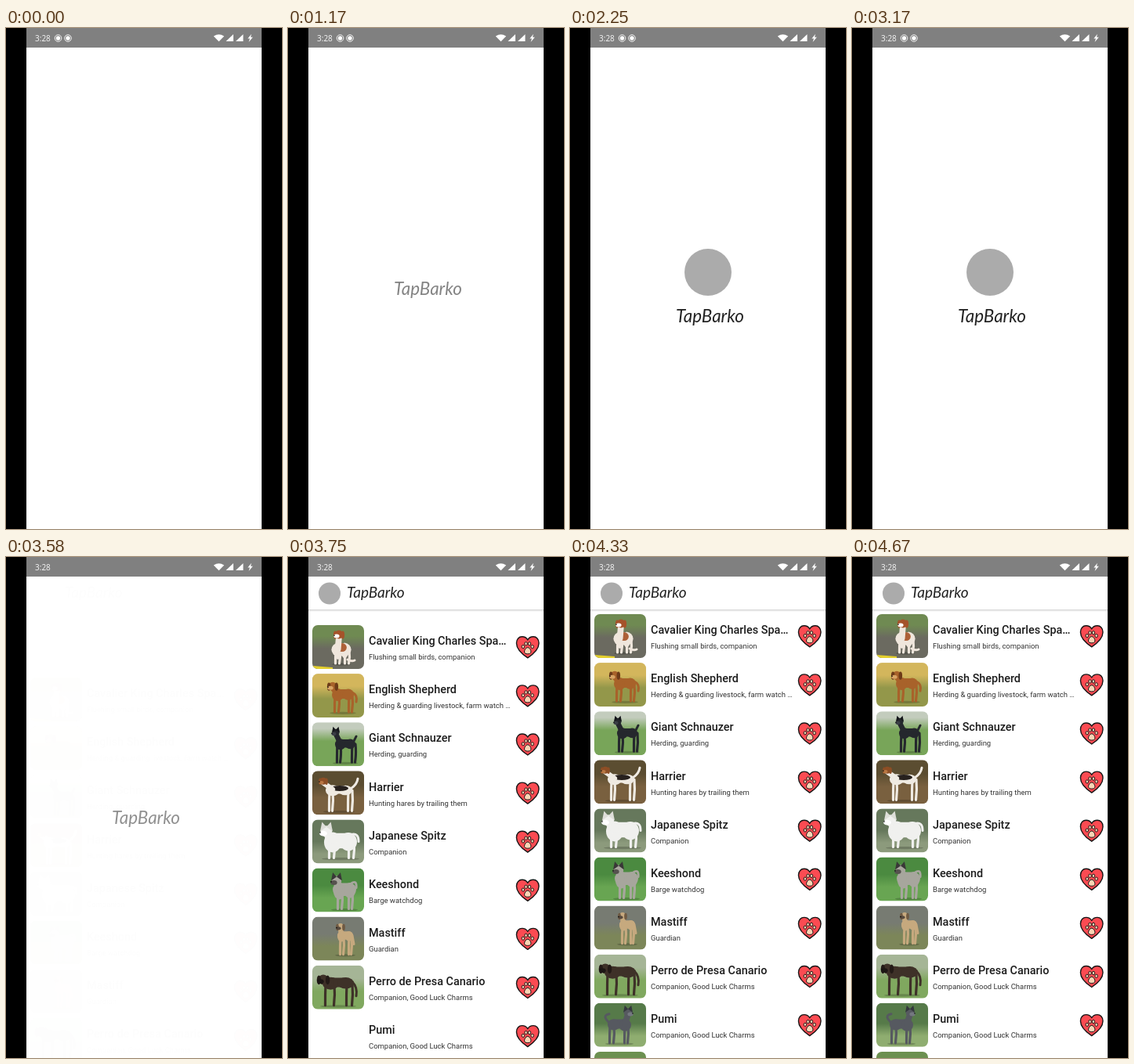
An HTML page for the animation above (4760 ms loop, 352 px wide and 640 px high).

```html
<!DOCTYPE html>
<html lang="en">
<head>
<meta charset="utf-8">
<title>Dog list</title>
<style>
html, body { margin: 0; width: 100%; height: 100%; overflow: hidden; background: #000; }
svg { display: block; width: 352px; height: 640px; }
.time { font: 10px "Noto Sans", sans-serif; fill: #f0f0f0; }
.brand { font: italic 400 22.4px Lato, sans-serif; fill: #222; }
.title { font: 500 14.4px Roboto, sans-serif; fill: #1c1c1c; }
.note { font: 400 9.46px Roboto, sans-serif; fill: #333; }
</style>
</head>
<body>
<svg viewBox="0 0 352 640" xmlns="http://www.w3.org/2000/svg">
  <defs>
    <clipPath id="screen"><rect x="26" y="0" width="300" height="640"/></clipPath>
    <clipPath id="thumb"><rect width="66" height="56" rx="7"/></clipPath>
    <linearGradient id="shade" x2="0" y2="1">
      <stop offset="0" stop-color="#d2d2d2"/><stop offset="1" stop-color="#fff"/>
    </linearGradient>
    <g id="heart">
      <path d="M0 13.8C-5 10.5-14.3 3.5-14.3-5C-14.3-10.3-11-13.2-7.2-13.2C-4-13.2-1.4-11.6 0-9.1C1.4-11.6 4-13.2 7.2-13.2C11-13.2 14.3-10.3 14.3-5C14.3 3.5 5 10.5 0 13.8Z"
        fill="#fb4b52" stroke="#151515" stroke-width="1.4" stroke-linejoin="round"/>
      <g fill="#fcd5b5" stroke="#151515" stroke-width="1">
        <path d="M0 .6C2.4.6 4.2 4 4.2 6C4.2 8.2 2.2 8.8 0 8.8C-2.2 8.8-4.2 8.2-4.2 6C-4.2 4-2.4.6 0 .6Z"/>
        <ellipse cx="-5.9" cy="-.4" rx="1.7" ry="2.1"/>
        <ellipse cx="-2.2" cy="-4.2" rx="1.7" ry="2.2"/>
        <ellipse cx="2.2" cy="-4.2" rx="1.7" ry="2.2"/>
        <ellipse cx="5.9" cy="-.4" rx="1.7" ry="2.1"/>
      </g>
    </g>
  </defs>
  <rect width="352" height="640"/>
  <g clip-path="url(#screen)">
    <rect x="26" width="300" height="640" fill="#fff"/>
    <circle id="logo" r="30" fill="#ababab"/>
    <text id="brand" class="brand" x="178.5" text-anchor="middle">TapBarko</text>
    <g id="home">
      <g id="list"></g>
      <rect x="26" y="25" width="300" height="42" fill="#fff"/>
      <rect x="26" y="67" width="300" height="3" fill="url(#shade)"/>
      <circle cx="53" cy="46.5" r="14" fill="#ababab"/>
      <text class="brand" x="75" y="52" style="font-size:19px">TapBarko</text>
    </g>
    <rect x="26" width="300" height="25" fill="#808080"/>
    <text class="time" x="37" y="16.6">3:28</text>
    <g id="dots" fill="#fff">
      <circle cx="66.5" cy="13" r="2.7"/><circle cx="79" cy="13" r="2.7"/>
      <g fill="none" stroke="#fff" stroke-width=".9">
        <circle cx="66.5" cy="13" r="4.3"/><circle cx="79" cy="13" r="4.3"/>
      </g>
    </g>
    <g fill="#fff">
      <path d="M271.5 17.2L264.8 10.6Q271.5 5.8 278.2 10.6Z"/>
      <path d="M280.5 17L290 8V17ZM293 17L302.5 8V17Z"/>
      <path d="M313 7.8L308.3 13.6H311L309.6 18L314.8 11.8H312Z"/>
    </g>
  </g>
</svg>
<script>
const LOOP = 4760, STEP = 1000 / 12, PITCH = 62.1;
const $ = id => document.getElementById(id);
const clamp = x => Math.max(0, Math.min(1, x));
const span = (t, a, b) => clamp((t - a) / (b - a));
const easeOut = x => 1 - (1 - x) ** 2;
const smooth = x => x * x * (3 - 2 * x);

// head: x, y, r; body: x, y, rx, ry; feet: four leg positions, then ground level
const dogs = [
  { name: 'Cavalier King Charles Spa…', job: 'Flushing small birds, companion',
    sky: '#6f8a52', ground: '#6b6a60', line: 22, coat: '#efe6dc', ear: '#a5532a', face: '#fff', back: '#ad6037',
    head: [34, 12, 6], body: [37, 33, 9, 11], feet: [30, 35, 42, 47, 49], tail: 'M45 44Q50 47 54 45',
    extra: '<path d="M0 52L26 54V56H0Z" fill="#e3cf2d"/>' },
  { name: 'English Shepherd', job: 'Herding & guarding livestock, farm watch …',
    sky: '#d3b65c', ground: '#93974a', line: 24, coat: '#a8622a', ear: '#6d3b18', face: '#d9a566',
    head: [26, 16, 6], body: [39, 27, 14, 8], feet: [29, 34, 47, 51, 49], tail: 'M51 24Q58 27 56 36' },
  { name: 'Giant Schnauzer', job: 'Herding, guarding',
    sky: '#c3ccbd', ground: '#78a559', line: 16, coat: '#25282d', ear: '#14161a', face: '#3b3f46', pointed: true,
    head: [30, 13, 5], body: [42, 28, 13, 7], feet: [32, 36, 51, 55, 51], tail: 'M53 24L56 18' },
  { name: 'Harrier', job: 'Hunting hares by trailing them',
    sky: '#5b4d31', ground: '#79603f', line: 26, coat: '#efeae2', ear: '#8d4e25', face: '#b97743', back: '#27211e',
    head: [14, 13, 5], body: [34, 25, 17, 7], feet: [22, 26, 46, 51, 51], tail: 'M50 22Q57 17 58 10' },
  { name: 'Japanese Spitz', job: 'Companion',
    sky: '#66785c', ground: '#8c9a7c', line: 36, coat: '#f0f0ee', ear: '#deded9', face: '#fff', pointed: true,
    head: [18, 15, 8], body: [36, 29, 21, 13], feet: [22, 28, 47, 53, 49], tail: 'M50 19Q59 17 59 28' },
  { name: 'Keeshond', job: 'Barge watchdog',
    sky: '#4b8a40', ground: '#68a552', line: 30, coat: '#a7a69d', ear: '#393837', face: '#55524e', pointed: true,
    head: [31, 16, 7], body: [41, 29, 14, 11], feet: [33, 38, 47, 51, 52], tail: 'M49 20Q57 14 56 25' },
  { name: 'Mastiff', job: 'Guardian',
    sky: '#777b72', ground: '#7c8659', line: 30, coat: '#c6a97e', ear: '#6f5a43', face: '#57493d',
    head: [36, 13, 5], body: [42, 25, 10, 7], feet: [36, 40, 47, 50, 48], tail: 'M51 24L53 35' },
  { name: 'Perro de Presa Canario', job: 'Companion, Good Luck Charms',
    sky: '#a5b596', ground: '#80a85f', line: 25, coat: '#3e3128', ear: '#241b17', face: '#1d1715',
    head: [14, 18, 7], body: [33, 23, 20, 8], feet: [17, 28, 44, 51, 51], tail: 'M51 21Q58 28 56 39' },
  { name: 'Pumi', job: 'Companion, Good Luck Charms',
    sky: '#567a49', ground: '#8fad70', line: 34, coat: '#565960', ear: '#34373d', face: '#747880', pointed: true,
    head: [43, 12, 6], body: [32, 28, 15, 8], feet: [20, 25, 39, 43, 51], tail: 'M19 25Q9 16 19 14' },
  { name: '', job: '', sky: '#6c9050', ground: '#6c9050', line: 40 }
];

function ellipse(x, y, rx, ry, fill) {
  return `<ellipse cx="${x}" cy="${y}" rx="${rx}" ry="${ry}" fill="${fill}"/>`;
}

function stroke(d, color, width) {
  return `<path d="${d}" fill="none" stroke="${color}" stroke-width="${width}" stroke-linecap="round"/>`;
}

function drawEar(x, y, r, side, d) {
  return d.pointed
    ? `<path d="M${x} ${y - r * .7}L${x + side * r * .7} ${y - r * 1.5}L${x + side * r} ${y}Z" fill="${d.ear}"/>`
    : ellipse(x + side * r * .8, y + r * .1, r * .38, r * .85, d.ear);
}

function drawDog(d) {
  const [x, y, r] = d.head, [bx, by, rx, ry] = d.body, foot = d.feet[4];
  const dir = x < bx ? -1 : 1, half = rx * .48;
  const chest = bx + dir * half, rump = bx - dir * half;
  const legs = d.feet.slice(0, 4).map((fx, i) => {
    const knee = fx + (i % 2 ? 1.2 : -.6);
    return stroke(`M${fx} ${by}Q${knee} ${(by + foot) / 2} ${fx - .5} ${foot}`, d.coat, 3.2);
  });
  return ellipse(bx, foot + 1.2, rx + 3, 1.6, '#0003')
    + stroke(d.tail, d.coat, 3) + legs.join('')
    + stroke(`M${chest} ${by - ry * .15}L${rump} ${by - ry * .15}`, d.coat, ry * 1.5)
    + ellipse(chest, by, rx - half, ry, d.coat)
    + ellipse(rump, by - ry * .05, rx - half, ry * .9, d.coat)
    + (d.back ? ellipse(bx - dir, by - ry * .4, rx * .65, ry * .5, d.back) : '')
    + stroke(`M${x} ${y + 2}L${chest} ${by - ry * .2}`, d.coat, r * 1.3)
    + ellipse(x, y, r * .9, r * .9, d.back ? d.ear : d.coat)
    + drawEar(x, y, r, -1, d) + drawEar(x, y, r, 1, d)
    + ellipse(x + dir * r * .5, y + r * .35, r * .6, r * .42, d.face)
    + ellipse(x + dir * r, y + r * .2, .9, .8, '#111');
}

function drawRow(d, i) {
  const stop = (y, color) => `<stop offset="${y / 56}" stop-color="${color}"/>`;
  return `<g transform="translate(31 ${73 + i * PITCH})">
    <linearGradient id="scene${i}" x2="0" y2="1">
      ${stop(d.line - 8, d.sky)}${stop(d.line + 8, d.ground)}
    </linearGradient>
    <g class="photo" clip-path="url(#thumb)">
      <rect width="66" height="56" fill="url(#scene${i})"/>
      ${d.extra || ''}${d.head ? drawDog(d) : ''}
    </g>
    <text class="title" x="72" y="25.3">${d.name}</text>
    <text class="note" x="72" y="44.3">${d.job.replace('&', '&amp;')}</text>
    <use href="#heart" x="274.7" y="28"/>
  </g>`;
}

$('list').innerHTML = dogs.map(drawRow).join('');
const latePhotos = [...document.querySelectorAll('.photo')].slice(8);

function render(ms) {
  const t = Math.floor((ms + 4) / STEP) * STEP;

  const open = smooth(span(t, 1583, 2000)) * (1 - smooth(span(t, 3250, 3500)));
  $('logo').setAttribute('transform', `translate(176 ${317 - 5 * open}) scale(${open})`);
  $('logo').setAttribute('opacity', open);
  $('brand').setAttribute('y', 341 + 35 * open);
  $('brand').setAttribute('opacity', easeOut(span(t, 1083, 1333)) * (1 - span(t, 3500, 3666)));

  const shown = t < 3580 ? 0 : t < 3660 ? .01 : span(t, 3560, 3740);
  const shift = t > 4300 ? 0 : 14 * Math.exp((3750 - t) / 95);
  $('home').setAttribute('opacity', shown);
  $('home').setAttribute('display', shown ? 'inline' : 'none');
  $('list').setAttribute('transform', `translate(0 ${shown ? shift : 0})`);
  latePhotos.forEach(p => p.setAttribute('opacity', span(t, 4000, 4333)));

  $('dots').setAttribute('opacity', t < 3330 ? 1 : 0);
}

const start = performance.now();
function tick() {
  render((performance.now() - start) % LOOP);
  requestAnimationFrame(tick);
}
tick();
</script>
</body>
</html>
```
